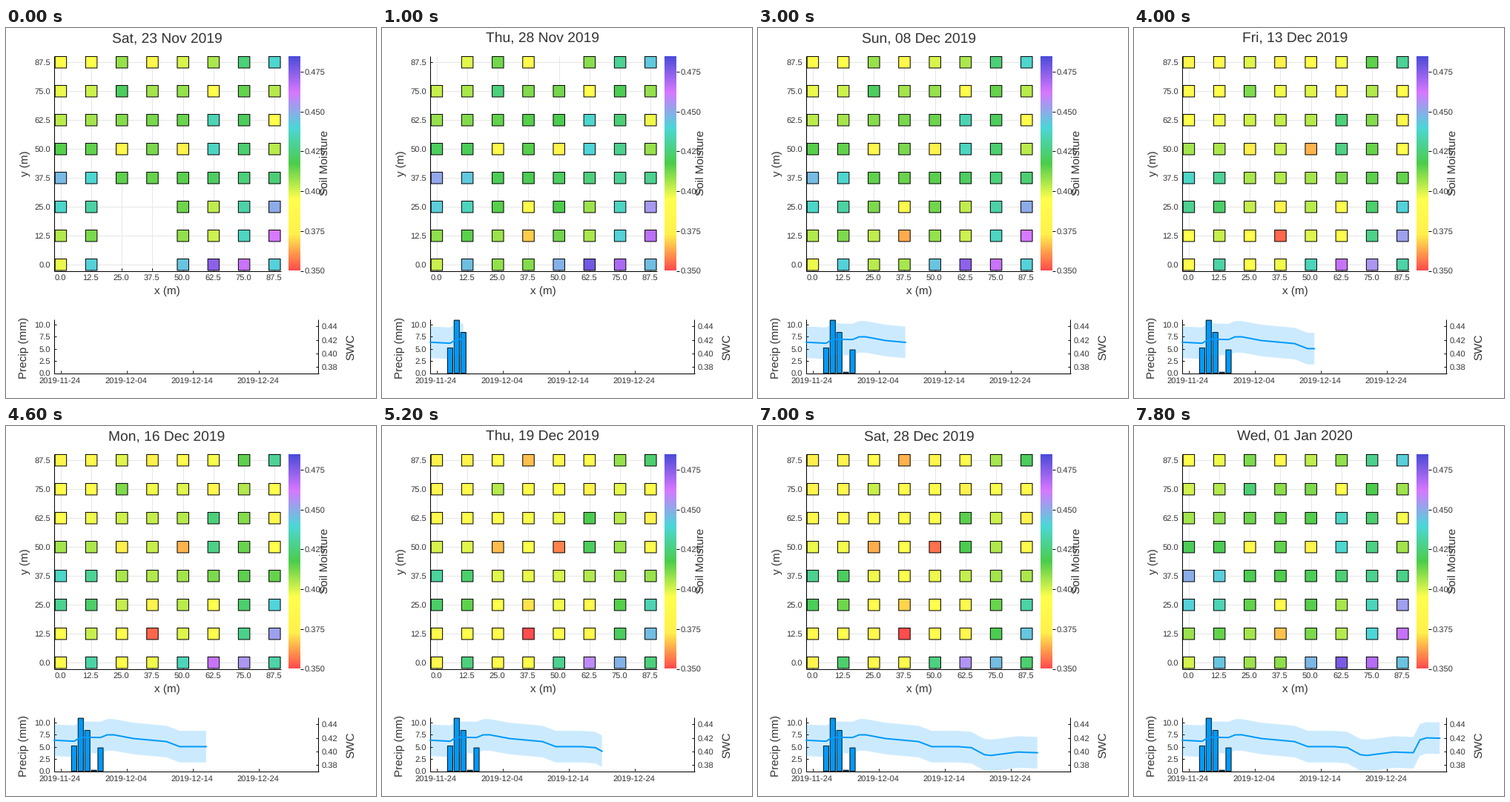
Animation of 499x499 px, one loop 8 s. Source, as a matplotlib script:

```python
import numpy as np
import matplotlib.pyplot as plt
from matplotlib.animation import FuncAnimation
from matplotlib.collections import PatchCollection
from matplotlib.colors import LinearSegmentedColormap
from matplotlib.patches import Polygon, Rectangle

SIZE, DPI, DAYS = 499, 100, 40
PX = 72 / DPI
INK, BLUE = "#333333", "#009afa"
LOW, HIGH = 0.350, 0.485
HALF = 7.75
SPREAD = 0.0234
RAIN = {3: 5.2, 4: 10.9, 5: 8.4, 6: 0.2, 7: 4.8}

plt.rcParams.update({"font.family": "Liberation Sans", "text.hinting": "none"})

rainbow = LinearSegmentedColormap.from_list("moisture", [
    "#ff4c4c", "#fff14c", "#ffff4c", "#4ccc4c", "#4cd7d7", "#d778ff", "#4c4cd7"], N=512)

# Turning points of the mean soil water content: day, value
TREND = [(0, .4165), (3, .415), (4, .421), (7, .4205), (8, .4245), (9, .4245), (12, .419),
         (17, .4145), (19, .407), (23, .407), (25, .4055), (27, .395), (28, .394),
         (32, .399), (35, .398), (36, .417), (37, .42), (39, .4195)]
swc = np.interp(np.arange(DAYS), *zip(*TREND))

# Wet and dry patches: column, row from north, width, height, strength
PATCHES = [
    (0.3, 4.4, 0.8, 0.8, 22), (5.1, 7, 1.1, 0.4, 31), (7, 5.8, 0.8, 0.8, 20),
    (1, 7, 0.5, 0.5, 21), (2, 0.6, 0.4, 0.7, 9), (6.8, 0, 0.7, 0.4, 14),
    (5, 2.5, 0.4, 0.6, 11), (7, 2.2, 0.4, 1, -14), (2, 3, 0.4, 0.4, -14),
    (4, 3, 0.4, 0.4, -20), (3, 5.7, 0.4, 0.6, -22), (5, 5.5, 0.4, 0.6, -10),
    (3, 0, 0.5, 0.4, -8), (5, 1, 0.4, 0.4, -10)]

row, col = np.mgrid[0:8, 0:8]
field = 16 + 1.3 * col + 7 * np.sin(np.pi * row / 7)
for c, r, w, h, strength in PATCHES:
    field += strength * np.exp(-((col - c) / w) ** 2 / 2 - ((row - r) / h) ** 2 / 2)
offset = (field - 27.4) / 60


def moisture(day):
    """Position of every sensor on the colour scale, 0 to 1."""
    return np.clip(offset + (swc[day] - LOW) / (HIGH - LOW), 0, 1)


def offline(day):
    if day < 3:
        return (row >= 5) & ((col == 2) | (col == 3))
    return (4 <= day <= 6) & (row == 0) & (col % 4 == 0)


def col_x(i):
    return 73.9 + 41.2 * i


def row_y(i):
    return 46.2 + 39 * i


def scale_y(value):
    return 327.5 - (value - LOW) * 2148


def day_x(day):
    return 65.2 + 8.9 * day


def rain_y(mm):
    return 465.5 - 6.55 * mm


def swc_y(value):
    return 438.8 - (value - 0.40) * 910


fig = plt.figure(figsize=(SIZE / DPI, SIZE / DPI), dpi=DPI, facecolor="white")
ax = fig.add_axes([0, 0, 1, 1])
ax.axis("off")


def line(x0, y0, x1, y1, color="black", z=3):
    ax.plot([x0, x1], [y0, y1], color=color, lw=PX, zorder=z, solid_capstyle="butt")


def label(x, y, s, size=11.1, ha="center", rot=0):
    drop = 0.35 * size
    x, y = (x + drop, y) if rot else (x, y + drop)
    return ax.text(x, y, s, fontsize=size * PX, ha=ha, va="baseline", color=INK,
                   rotation=rot, rotation_mode="anchor", zorder=8)


# Field map
for i in range(8):
    x, y, name = col_x(i), row_y(i), f"{12.5 * i:.1f}"
    line(x, 38, x, 327, "#e6e6e6", 1)
    line(65, y, 371, y, "#e6e6e6", 1)
    line(x, 324, x, 327)
    line(65, y, 68, y)
    label(x - 1, 336.3, name)
    label(60, row_y(7 - i), name, ha="right")
line(65.5, 38, 65.5, 328)
line(65, 327.5, 371, 327.5)
label(217, 353.4, "x (m)", 15.3)
label(24.2, 182.3, "y (m)", 15.3, rot=90)
title = label(217, 12.5, "", 19.3)

cells = PatchCollection(
    [Rectangle((col_x(c) - HALF, row_y(r) - HALF), 2 * HALF, 2 * HALF)
     for r in range(8) for c in range(8)], lw=PX, zorder=4, snap=False)
ax.add_collection(cells)

# Colour scale
ax.imshow(np.linspace(1, 0, 289)[:, None], cmap=rainbow, extent=(381.5, 397, 327, 38),
          aspect="auto", interpolation="nearest", zorder=2)
for v in np.arange(0.35, 0.48, 0.025):
    line(397, scale_y(v), 401.5, scale_y(v))
    label(403, scale_y(v), f"{v:.3f}", ha="left")
label(429.5, 181.5, "Soil Moisture", 15.3, rot=90)

# Rain and water content
for mm in np.arange(0, 10.1, 2.5):
    line(65, rain_y(mm), 68, rain_y(mm))
    label(60, rain_y(mm), f"{mm:.1f}", ha="right")
for v in (0.38, 0.40, 0.42, 0.44):
    line(418, swc_y(v), 421, swc_y(v))
    label(426, swc_y(v), f"{v:.2f}", ha="left")
first = np.datetime64("2019-11-23")
for d in range(1, DAYS - 5, 10):
    line(day_x(d), 462, day_x(d), 465)
    label(day_x(d) - 1.7, 475.5, str(first + d))
line(65.5, 393, 65.5, 466)
line(421.5, 393, 421.5, 466)
line(65, 465.5, 422, 465.5)
label(22.5, 431, "Precip (mm)", 15.3, rot=90)
label(463.5, 430.5, "SWC", 15.3, rot=90)

bars = {}
for d, mm in RAIN.items():
    bars[d] = ax.add_patch(Rectangle(
        (day_x(d) - 3.55, rain_y(mm)), 7.1, 6.55 * mm,
        fc=BLUE, ec="black", lw=PX, zorder=4, snap=False))
ribbon = ax.add_patch(Polygon([(0, 0)] * 3, fc=BLUE, ec="none", alpha=0.2, zorder=5))
trend, = ax.plot([], [], color=BLUE, lw=2 * PX, zorder=6)

ax.set_xlim(0, SIZE)
ax.set_ylim(SIZE, 0)


def update(day):
    title.set_text((first + day).item().strftime("%a, %d %b %Y"))

    face = rainbow(moisture(day).ravel())
    edge = np.tile([0.0, 0.0, 0.0, 1.0], (64, 1))
    gap = offline(day).ravel()
    face[gap, 3] = edge[gap, 3] = 0
    cells.set_facecolor(face)
    cells.set_edgecolor(edge)

    for d, bar in bars.items():
        bar.set_visible(d <= day)

    x, mean = day_x(np.arange(day + 1)), swc[:day + 1]
    low = np.minimum(swc_y(mean - SPREAD), 465.5)
    high = swc_y(mean + SPREAD)
    ribbon.set_xy(np.column_stack([np.r_[x, x[::-1]], np.r_[high, low[::-1]]]))
    ribbon.set_visible(day > 0)
    trend.set_data(x, swc_y(mean))
    trend.set_visible(day > 0)
    return ()


anim = FuncAnimation(fig, update, frames=DAYS, interval=200, repeat=True, repeat_delay=0)
plt.show()
```
